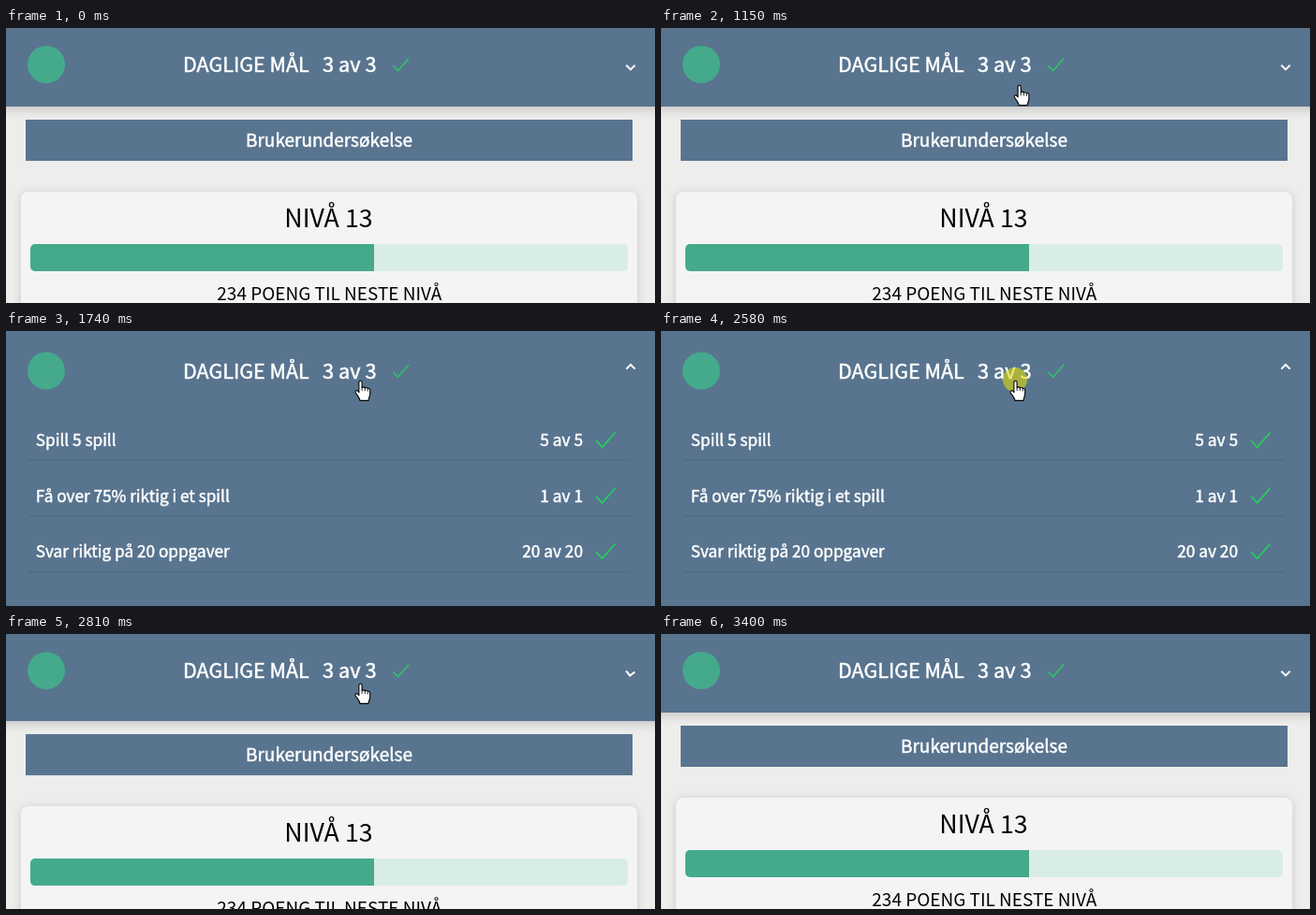
Write an HTML page that moves like this. It is 693 by 294 pixels and loops after 4520 ms.

```html
<!DOCTYPE html>
<html lang="no">
<head>
<meta charset="utf-8">
<title>Daglige mål</title>
<style>
  html, body { margin: 0; width: 100%; height: 100%; overflow: hidden; background: #ededec; }
  svg { display: block; width: 693px; height: 294px; }
  text { font-family: "Noto Sans CJK JP", "Noto Sans CJK SC", "Noto Sans CJK", "Noto Sans", sans-serif; white-space: pre; }
  .light { fill: #fff; stroke: #fff; stroke-width: .5px; }
  .middle { text-anchor: middle; }
  .end { text-anchor: end; }
  .line { fill: none; }
  #panel { filter: drop-shadow(0 2px 6px rgba(0, 0, 0, .2)); }
  #card { filter: drop-shadow(0 1px 5px rgba(0, 0, 0, .14)); }
</style>
</head>
<body>
<svg viewBox="0 0 693 294">
  <defs>
    <clipPath id="panelClip"><rect id="clipBox" width="693" height="84"/></clipPath>
  </defs>

  <g id="page">
    <rect x="21" y="98" width="648" height="44" fill="#58748f"/>
    <text class="light middle" x="345" y="127" font-size="19">Brukerundersøkelse</text>
    <rect id="card" x="16" y="175" width="658" height="180" rx="8" fill="#f4f4f4"/>
    <text class="middle" x="344.5" y="213" font-size="26.8">NIVÅ 13</text>
    <rect x="26" y="231" width="638" height="29" rx="5" fill="#d8ede6"/>
    <path d="M393 231H31a5 5 0 0 0-5 5v19a5 5 0 0 0 5 5H393z" fill="#44aa8b"/>
    <text class="middle" x="345.3" y="291" font-size="19">234 POENG TIL NESTE NIVÅ</text>
  </g>

  <rect id="panel" x="-20" y="-20" width="733" height="104" fill="#58748f"/>
  <g clip-path="url(#panelClip)"><g id="rows"></g></g>

  <g id="header">
    <circle cx="43" cy="39" r="20" fill="#44aa8b"/>
    <text class="light" x="189" y="47" font-size="21.5">DAGLIGE MÅL</text>
    <text class="light" x="338" y="47" font-size="21.8">3 av 3</text>
    <path class="line" d="M413.2 40.2L418.6 45.6L430 32.6" stroke="#2cc765" stroke-width="1.5"/>
    <path id="chevron" class="line" d="M662.3 39.8L667 44.4L671.7 39.8" stroke="#fff" stroke-width="2"/>
  </g>

  <circle id="click" cx="378" cy="52" r="13" fill="#dfda0a" fill-opacity=".6"/>
  <g id="cursor" stroke="#000" stroke-width="1.1" stroke-linejoin="round">
    <g id="hand">
      <path fill="#fff" d="M-1.6 13V2.2a1.6 1.6 0 0 1 3.2 0V8.2c.3-1.3 3-1.2 3.2.4c.4-1 2.8-.9 3 .6c.5-.8 2.4-.5 2.4 1.2V15c0 2.5-1.6 3.5-1.7 6.8H-.5c-.2-3-2.8-5-4.8-8.6c-.8-1.6 1.1-2.9 2.3-1.6z"/>
      <path class="line" stroke-width=".8" d="M1.6 8v3.6M4.8 8.6v3M7.8 9.2v2.8"/>
    </g>
    <path id="arrow" fill="#fff" d="M0 0V16.5L3.8 13L6.3 18.8L8.8 17.7L6.3 12H11.7z"/>
  </g>
</svg>

<script>
const LOOP = 4520;
const CLOSED = 84, OPEN = 310, TOGGLE = 225;
const OPEN_AT = 1478, CLOSE_AT = 2642;
const HEADER_SHIFT = 3.6;
const REST = { x: 378, y: 52 };

const el = id => document.getElementById(id);
const move = (id, x, y) => el(id).setAttribute('transform', `translate(${x} ${y})`);
const show = (id, on) => el(id).setAttribute('visibility', on ? 'visible' : 'hidden');
const clamp = v => Math.min(1, Math.max(0, v));
const progress = (t, start, length) => clamp((t - start) / length);

const goals = [
  ['Spill 5 spill', '5 av 5'],
  ['Få over 75% riktig i et spill', '1 av 1'],
  ['Svar riktig på 20 oppgaver', '20 av 20'],
];
el('rows').innerHTML = goals.map(([label, count], i) => `
  <g transform="translate(0 ${i * 59.5})">
    <text class="light" x="31.8" y="123" font-size="17.2">${label}</text>
    <text class="light end" x="616" y="123" font-size="17.3">${count}</text>
    <path class="line" d="M630.2 117.2L636.6 124.2L650.5 108.5" stroke="#1fd655" stroke-width="1.6"/>
    <path d="M24 138.3H666" stroke="#4d6882"/>
  </g>`).join('');

// cubic-bezier(.4, 0, .2, 1)
function ease(x) {
  let low = 0, high = 1, s = .5;
  for (let i = 0; i < 24; i++) {
    s = (low + high) / 2;
    const r = 1 - s;
    if (1.2 * r * r * s + .6 * r * s * s + s ** 3 < x) low = s; else high = s;
  }
  return s * s * (3 - 2 * s);
}

function openness(t) {
  if (t < OPEN_AT || t >= CLOSE_AT + TOGGLE) return 0;
  if (t < CLOSE_AT) return t >= OPEN_AT + TOGGLE ? 1 : ease(progress(t, OPEN_AT, TOGGLE));
  return 1 - ease(progress(t, CLOSE_AT, TOGGLE));
}

function cursorAt(t) {
  const arriving = (1 - progress(t, 570, 710)) ** 2;
  const leaving = progress(t, 2900, 490) ** 2;
  return {
    x: REST.x + 127 * arriving + 133 * leaving,
    y: REST.y + 248 * arriving + 246 * leaving,
  };
}

function draw(now) {
  const t = now % LOOP;
  const open = openness(t);
  const offset = (OPEN - CLOSED) * open;

  move('page', 0, offset);
  el('panel').setAttribute('height', CLOSED + 20 + offset);
  el('clipBox').setAttribute('height', CLOSED + offset);
  move('rows', 0, -7 * (1 - open));
  show('rows', open > 0);
  move('header', 0, HEADER_SHIFT * open);
  el('chevron').setAttribute('transform', `rotate(${180 * open} 667 38.4)`);

  const tip = cursorAt(t);
  const overPanel = tip.y < CLOSED + offset;
  const overButton = tip.y >= 98 + offset && tip.y < 142 + offset;
  const pointing = overPanel || overButton;
  const present = t >= 590 && t < 3400;
  move('cursor', tip.x + .5, tip.y + .6);
  show('hand', present && pointing);
  show('arrow', present && !pointing);
  show('click', (t >= 1420 && t < 1490) || (t >= 2580 && t < 2660));

  requestAnimationFrame(draw);
}
draw(0);
</script>
</body>
</html>
```
